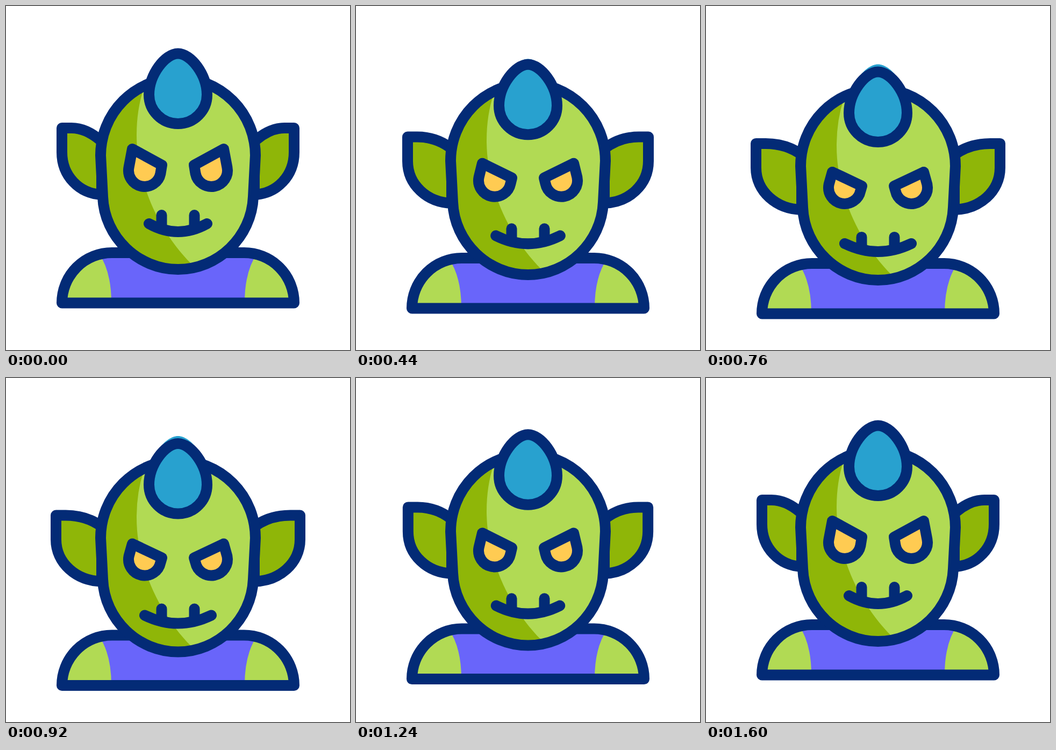
An HTML page that plays this animation: 640 by 640 pixels, repeating every 2160 ms.

```html
<!DOCTYPE html>
<html lang="en">
<head>
<meta charset="utf-8">
<title>Goblin</title>
<style>
  html, body { margin: 0; height: 100%; overflow: hidden; background: #fff; }
  svg { display: block; width: 100%; height: 100%; }
</style>
</head>
<body>
<svg viewBox="0 0 640 640"><g id="goblin" stroke="#032b76" stroke-width="20" stroke-linecap="round" stroke-linejoin="round"></g></svg>
<script>
const LOOP = 2160, STEP = 40;
const LIGHT = '#b1da54', DARK = '#8fb608', PURPLE = '#6965fa', BLUE = '#28a1cf', YELLOW = '#ffcb52';
const HEAD = 'M176 278A144 144 0 0 1 464 278L460 355C457 430 394 490 320 490C246 490 183 430 180 355Z';
const HAIR = 'M320 88.5C296 88.5 266 128 266 165A54 54 0 0 0 374 165C374 128 344 88.5 320 88.5Z';
const BODY = 'M104 552.5A93 93.5 0 0 1 197 459H443A93 93.5 0 0 1 536 552.5Z';
const SHIRT = 'M172 459Q196 493 196 552H444Q444 493 468 459Z';
const SHADE = 'M258 148Q243 190 243 240C243 330 285 420 345 480L320 490C246 490 183 430 180 355L176 278A144 144 0 0 1 258 148Z';

const goblin = document.getElementById('goblin');

// cubic-bezier(.6, 0, .4, 1)
function ease(x) {
  if (x <= 0) return 0;
  if (x >= 1) return 1;
  let lo = 0, hi = 1;
  for (let i = 0; i < 24; i++) {
    const t = (lo + hi) / 2, u = 1 - t;
    if (1.8 * t * u * u + 1.2 * t * t * u + t * t * t < x) lo = t; else hi = t;
  }
  return lo * lo * (3 - 2 * lo);
}

const pulse = (t, a, b, c, d) => ease((t - a) / (b - a)) - ease((t - c) / (d - c));
const shape = (d, fill = 'none') => `<path d="${d}" fill="${fill}"/>`;
const flat = (d, fill) => `<path d="${d}" fill="${fill}" stroke="none"/>`;
const pair = part => part + `<g transform="matrix(-1 0 0 1 640 0)">${part}</g>`;

function ear(s) {
  const x = 104 - 11 * s, y = 9 * s;
  return shape(`M${x} ${227 + y}H${122 - 11 * s}C${142 - 6 * s} ${227 + y} ${160 - 2 * s} ${236 + 6 * s} 178 ${252 + 5 * s}
    V${351 + 8 * s}C${136 - 5 * s} ${349 + y} ${x} ${316 + y} ${x} ${272 + y}Z`, DARK);
}

function eye(s) {
  return shape(`M235 ${266 + 23 * s}L290 ${296 + 19 * s}L287.4 ${312 + 12 * s}A30 30 0 0 1 228.6 ${300 + 12 * s}Z`, YELLOW);
}

function mouth(s) {
  const y = 17 * s, w = 54 + 8 * s;
  return shape(`M${320 - w} ${405 + y}Q320 ${435 + y} ${320 + w} ${405 + y}`) +
    pair(shape(`M289.5 ${389 + 21 * s}V${412 + y}`));
}

function draw(t) {
  const drop = 20 * pulse(t, 80, 800, 800, 1600);
  const scowl = pulse(t, 80, 680, 960, 1600);
  goblin.setAttribute('transform', `translate(0 ${drop})`);
  goblin.innerHTML =
    pair(ear(scowl)) +
    flat(BODY, LIGHT) + flat(SHIRT, PURPLE) + shape(BODY) +
    flat(HEAD, LIGHT) + flat(SHADE, DARK) + shape(HEAD) +
    flat(HAIR, BLUE) + `<g transform="translate(0 ${14 * scowl})">${shape(HAIR, BLUE)}</g>` +
    pair(eye(scowl)) + mouth(scowl);
}

function frame() {
  const t = performance.now() % LOOP;
  draw(Math.floor(t / STEP) * STEP);
  requestAnimationFrame(frame);
}
frame();
</script>
</body>
</html>
```
